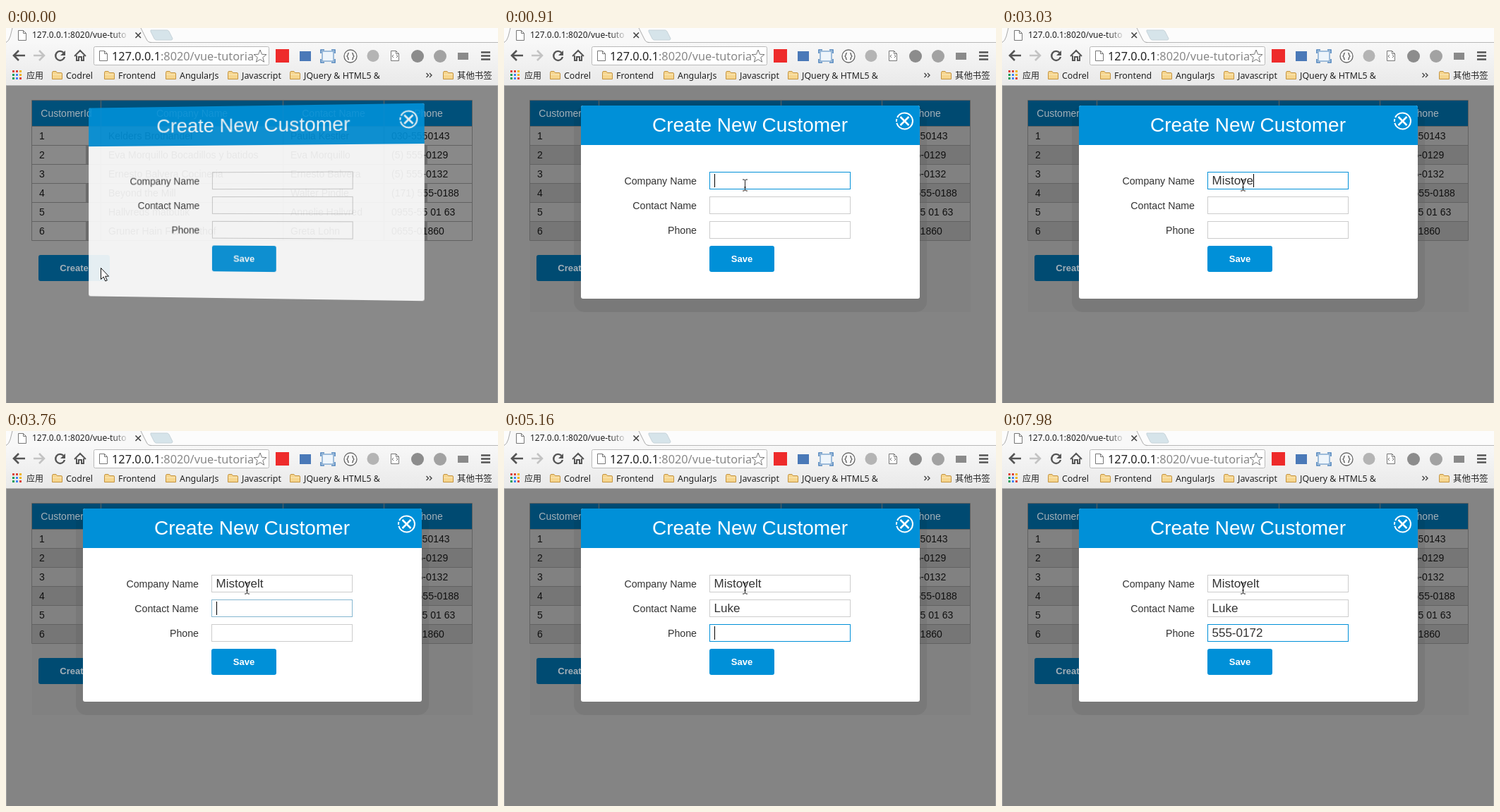
These frames come from a looping animation (697x532 px, 8 s). An HTML page:

```html
<!DOCTYPE html>
<html lang="en">
<head>
<meta charset="utf-8">
<title>Customer form</title>
<style>
html, body { margin: 0; width: 100%; height: 100%; overflow: hidden; background: #848484; }
svg { position: absolute; left: 0; top: 0; width: 697px; height: 532px; overflow: hidden; }
text { white-space: pre; }
.ui { font: 12px "Noto Sans", "Open Sans", "Noto Sans CJK SC", "Noto Sans CJK", sans-serif; fill: #222; }
.ui.mark { font-size: 12.4px; }
.ui.url { font-size: 16.3px; }
.ar { font: 14px "Liberation Sans", Arial, sans-serif; }
.ar.label { font-size: 14.2px; }
.ar.value { font-size: 17px; }
.ar.title { font-size: 28px; }
.btn { font: bold 13px "Liberation Sans", Arial, sans-serif; text-anchor: middle; }
.mid { text-anchor: middle; }
#modal { transform-origin: 349px 247px; }
</style>
</head>
<body>
<svg id="page" viewBox="0 0 697 532">
  <defs>
    <linearGradient id="bar" x2="0" y2="1"><stop stop-color="#f8f8f8"/><stop offset="1" stop-color="#e9e9e9"/></linearGradient>
    <linearGradient id="fade"><stop stop-color="#f8f8f8" stop-opacity="0"/><stop offset="1" stop-color="#f8f8f8"/></linearGradient>
    <clipPath id="urlClip"><rect x="125" y="27" width="225" height="25"/></clipPath>
    <g id="sheet" fill="#fff" stroke="#777"><path d="M.5 .5H7.500L11.500 4.500V14.500H.5Z"/><path d="M7.500 .5V4.500H11.500" fill="none"/></g>
    <g id="folder" stroke="#c39340"><path d="M.5 3.500Q.5 1.500 2 1.500H6L7.500 3.500H13Q14.500 3.500 14.500 5V12.500H.5Z" fill="#f6d58d"/><path d="M1 6H14" stroke="#fbe9bd"/></g>
  </defs>
  <g id="chrome"></g>
  <g id="body"></g>
</svg>
<svg id="modal" viewBox="0 0 697 532"></svg>
<svg id="top" viewBox="0 0 697 532">
  <path id="arrow" d="M134.500 340.500V356.500L138.200 353L140.800 359L143.300 358L140.700 352.200H145.500Z" fill="#fff" stroke="#111"/>
  <path id="beam" d="M-3 -8H-1L.5 -7L2 -8H4M.5 -7V7M-3 8H-1L.5 7L2 8H4M-1 3H2" fill="none" stroke="#222"/>
</svg>
<script>
const LOOP = 8000, BLUE = [0, 144, 216], GREY = [204, 204, 204];
const $ = id => document.getElementById(id);
const text = (x, y, s, cls, extra = '') => `<text x="${x}" y="${y}" class="${cls}" ${extra}>${s.replace(/&/g, '&amp;')}</text>`;
const rect = (x, y, w, h, fill, extra = '') => `<rect x="${x}" y="${y}" width="${w}" height="${h}" fill="${fill}" ${extra}/>`;
const line = (d, stroke, w = 1, extra = '') => `<path d="${d}" fill="none" stroke="${stroke}" stroke-width="${w}" ${extra}/>`;
const use = (id, x, y) => `<use href="#${id}" x="${x}" y="${y}"/>`;
const mix = (a, b, k) => `rgb(${a.map((v, i) => Math.round(v + (b[i] - v) * k))})`;

function drawChrome() {
  let s = rect(0, 0, 697, 21, '#fcfcfc') + rect(0, 20, 697, 62, 'url(#bar)') + line('M203 20.500H697', '#b8b8b8');
  s += '<path d="M0 21Q4 20 6 13L9 0H190L199 16Q201 20.500 206 21Z" fill="#f8f8f8"/>';
  s += line('M0 20.500Q4 19 6 12L9 0M191 0L199 16Q201 20.500 206 20.500', '#aaa');
  s += '<path d="M205 3H228Q230 3 231 5L236 15Q236 17 234 17H213Q211 17 210 15L205 5Z" fill="#d6e4ea" stroke="#c6d3d9"/>';
  s += use('sheet', 17, 3) + text(37, 14, '127.0.0.1:8020/vue-tuto', 'ui') + rect(150, 2, 25, 17, 'url(#fade)');
  s += line('M183.500 6.500L191 14M191 6.500L183.500 14', '#444', 1.600);
  // navigation
  s += line('M18 32L11 39L18 46M11.500 39H27', '#555', 2.600) + line('M47 32L54 39L47 46M39 39H53', '#c3c3c3', 2.600);
  s += line('M81.500 35A6.500 6.500 0 1 0 83 41', '#555', 2.400) + '<path d="M84 32V39H77Z" fill="#555"/>';
  s += line('M97 40L105 32L113 40M100 39V46H103V41H107V46H110V39', '#555', 2);
  s += rect(124.5, 26.5, 248, 26, '#fff', 'rx="2" stroke="#b9b9b9"') + use('sheet', 132, 32);
  s += `<g clip-path="url(#urlClip)"><text x="150" y="46" class="ui url">127.0.0.1<tspan fill="#888">:8020/vue-tutorial</tspan></text></g>`;
  let star = '';
  for (let i = 0; i < 10; i++) {
    const r = i % 2 ? 4 : 9.5, a = i * Math.PI / 5;
    star += `${i ? 'L' : 'M'}${(360 + r * Math.sin(a)).toFixed(1)} ${(40.5 - r * Math.cos(a)).toFixed(1)}`;
  }
  s += `<path d="${star}Z" fill="#fff" stroke="#777"/>`;
  // extensions
  s += rect(382, 30, 19, 19, '#ee2b2b') + rect(416, 33, 16, 14, '#4a79b8');
  s += rect(448, 33, 16, 14, '#eef5fb', 'stroke="#4b83bd"') + line('M446 36V31H451M461 31H466V36M466 44V49H461M451 49H446V44', '#4b83bd', 1.600);
  s += '<circle cx="488" cy="40" r="9" fill="#fafafa" stroke="#666" stroke-width="1.300"/>';
  s += line('M486 35.500Q484 35.500 484.500 38L483 40L484.500 42Q484 44.500 486 44.500M490 35.500Q492 35.500 491.500 38L493 40L491.500 42Q492 44.500 490 44.500', '#555', 1.200);
  s += '<circle cx="520" cy="39.500" r="8.500" fill="#b4b4b4"/>' + use('sheet', 545, 32) + line('M549 38l-2 2l2 2M553 38l2 2l-2 2', '#666');
  s += '<circle cx="583" cy="40" r="9" fill="#8c8c8c"/><circle cx="615" cy="40" r="9" fill="#a2a2a2"/>' + rect(640, 35, 15, 10, '#8a8a8a');
  s += line('M673 34.500H686M673 39.500H686M673 44.500H686', '#555', 2.600);
  // bookmarks
  const dots = ['#db4437', '#db4437', '#f0b400', '#0f9d58', '#4285f4', '#f0b400', '#0f9d58', '#4285f4', '#db4437'];
  s += dots.map((c, i) => rect(9 + i % 3 * 5, 60 + Math.floor(i / 3) * 5, 3, 3, c)).join('') + text(29, 72, '应用', 'ui');
  [[65, 'Codrel'], [139, 'Frontend'], [226, 'AngularJs'], [314, 'Javascript'], [402, 'JQuery & HTML5 &'], [619, '其他书签']].forEach(([x, name]) => {
    s += use('folder', x, 60) + text(x + 20, 72, name, 'ui mark');
  });
  s += line('M595.500 64l3 3l-3 3M600 64l3 3l-3 3', '#444', 1.400) + rect(0, 81, 697, 1, '#b4b4b4');
  $('chrome').innerHTML = s;
}

function drawPage() {
  const rows = [
    ['Kelders Brothandel', 'Paula Kestler', '030-5550143'],
    ['Eva Morquillo Bocadillos y batidos', 'Eva Morquillo', '(5) 555-0129'],
    ['Ernesto Balvera Cocineria', 'Ernesto Balvera', '(5) 555-0132'],
    ['Beyond the Mill', 'Walter Pindle', '(171) 555-0188'],
    ['Hallvreds matbutik', 'Annelie Hallvred', '0955-55 01 63'],
    ['Gruner Hain Feinkosthof', 'Greta Lohn', '0655-01860']];
  const even = [167, 221, 275];
  let s = rect(0, 82, 697, 450, '', 'id="ground"') + rect(0, 82, 1, 450, '#a0a0a0') + rect(696, 82, 1, 450, '#a0a0a0');
  s += rect(37, 103, 624, 36, '', 'id="head"') + '<g id="bands">' + even.map(y => rect(37, y, 624, 26, '#787878')).join('') + '</g>';
  s += '<g id="strips">' + even.map(y => rect(113, y, 4, 26, '#6c6c6c') + rect(593, y, 4, 26, '#6c6c6c')).join('') + '</g>';
  s += rect(37, 106, 624, 297, '#000', 'id="dim"') + '<rect id="shadow" rx="15" fill="#000"/>';
  s += line('M36.500 102.500H660.500V301.500H36.500ZM134.500 103V301M392.500 103V301M535.500 103V301' +
    rows.map((_, i) => `M37 ${139.5 + 27 * i}H660`).join(''), '#626262');
  [[85.5, 'CustomerId'], [263.5, 'Company Name'], [464, 'Contact Name'], [598.5, 'Phone']].forEach(([x, h]) => {
    s += text(x, 126, h, 'ar mid', 'fill="#a4b0b8"');
  });
  rows.forEach((r, i) => [i + 1 + '', ...r].forEach((v, c) => {
    s += text([47, 145, 403, 546][c], 158 + 27 * i, v, 'ar', 'fill="#111"');
  }));
  s += rect(46, 322, 101, 37, '', 'rx="3" id="create"') + text(96.5, 345, 'Create', 'btn', 'fill="#a4b0b8"');
  $('body').innerHTML = s;
}

// keys: the moment each character appears
const fields = [
  { label: 'Company Name', value: 'Mistovelt', from: 640, to: 3760, keys: [2180, 2330, 2480, 2600, 2750, 2880, 3030, 3340, 3490] },
  { label: 'Contact Name', value: 'Luke', from: 3760, to: 4890, keys: [4250, 4370, 4650, 4770] },
  { label: 'Phone', value: '555-0172', from: 4890, to: LOOP, keys: [5280, 5400, 5670, 6070, 7030, 7160, 7300, 7550] }];
const caretOff = [[1060, 1590], [6500, 7030], [7980, LOOP]];

function drawModal() {
  let s = rect(109, 110, 480, 274, '#fff', 'rx="3"') + '<path d="M109 166V113Q109 110 112 110H586Q589 110 589 113V166Z" fill="#0090d8"/>';
  s += text(348.5, 147, 'Create New Customer', 'ar mid title', 'fill="#fff"');
  s += '<circle cx="567.500" cy="132" r="11.500" fill="none" stroke="#fff" stroke-width="2" stroke-dasharray="33 2 4 2 31.300"/>';
  s += line('M561.500 126L573.500 138M573.500 126L561.500 138', '#fff', 2.500);
  fields.forEach((f, i) => {
    const y = 204 + 35 * i;
    s += text(273, y + 18, f.label, 'ar label', 'fill="#333" text-anchor="end"');
    s += rect(291.5, y + .5, 199, 24, '#fff', `id="box${i}"`) + text(297.5, y + 18, '', 'ar value', `id="val${i}" fill="#333"`);
  });
  s += rect(0, 0, 1, 19, '#000', 'id="caret"') + rect(291, 309, 92, 37, '#0090d8', 'rx="3"') + text(337, 332, 'Save', 'btn', 'fill="#fff"');
  $('modal').innerHTML = s;
}

const set = (id, attrs) => { for (const k in attrs) $(id).setAttribute(k, attrs[k]); };
const show = (id, on) => { $(id).style.display = on ? '' : 'none'; };
const progress = (t, steps) => steps.filter(k => t >= k).length / steps.length;
const glow = dt => dt < 0 ? 0 : dt < 120 ? .35 : dt < 240 ? .8 : 1;

function render(t) {
  const opening = t < 130;
  $('modal').style.transform = opening ? 'perspective(1200px) scale(.998) rotateY(-7.2deg)' : 'none';
  $('modal').style.opacity = opening ? .9 : 1;
  ['arrow', 'strips'].forEach(id => show(id, opening));
  ['beam', 'bands', 'shadow'].forEach(id => show(id, !opening));

  const settled = progress(t, [130, 250, 370]);
  const grow = Math.max(0, settled * 6 - 2);
  set('ground', { fill: opening ? '#898989' : '#848484' });
  set('head', { fill: opening ? '#00507a' : '#004b73' });
  set('dim', { opacity: settled * .02 });
  set('shadow', { x: 103 - grow, width: 492 + 2 * grow, y: 112, height: 288 + grow * .75, opacity: .1 - grow * .01 });

  const faded = progress(t, [250, 370, 520, 640, 790, 910]);
  set('create', { fill: opening ? '#00507a' : mix([34, 104, 142], [0, 75, 114], faded) });

  const [bx, by] = t < 250 ? [327, 275] : t < 370 ? [333, 250] : t < 520 ? [338, 232] : [341, 223];
  set('beam', { transform: `translate(${bx} ${by})` });

  show('caret', false);
  fields.forEach((f, i) => {
    const focused = t >= f.from && t < f.to, val = $('val' + i);
    val.textContent = f.value.slice(0, f.keys.filter(k => t >= k).length);
    set('box' + i, { stroke: mix(GREY, BLUE, focused ? glow(t - f.from) : 0) });
    if (!focused) return;
    const width = val.textContent ? val.getComputedTextLength() : 0;
    set('caret', { x: Math.round(297.5 + width), y: 207 + 35 * i });
    show('caret', !caretOff.some(([a, b]) => t >= a && t < b));
  });
}

drawChrome();
drawPage();
drawModal();
const start = performance.now();
function tick() {
  render((performance.now() - start) % LOOP);
  requestAnimationFrame(tick);
}
tick();
</script>
</body>
</html>
```
